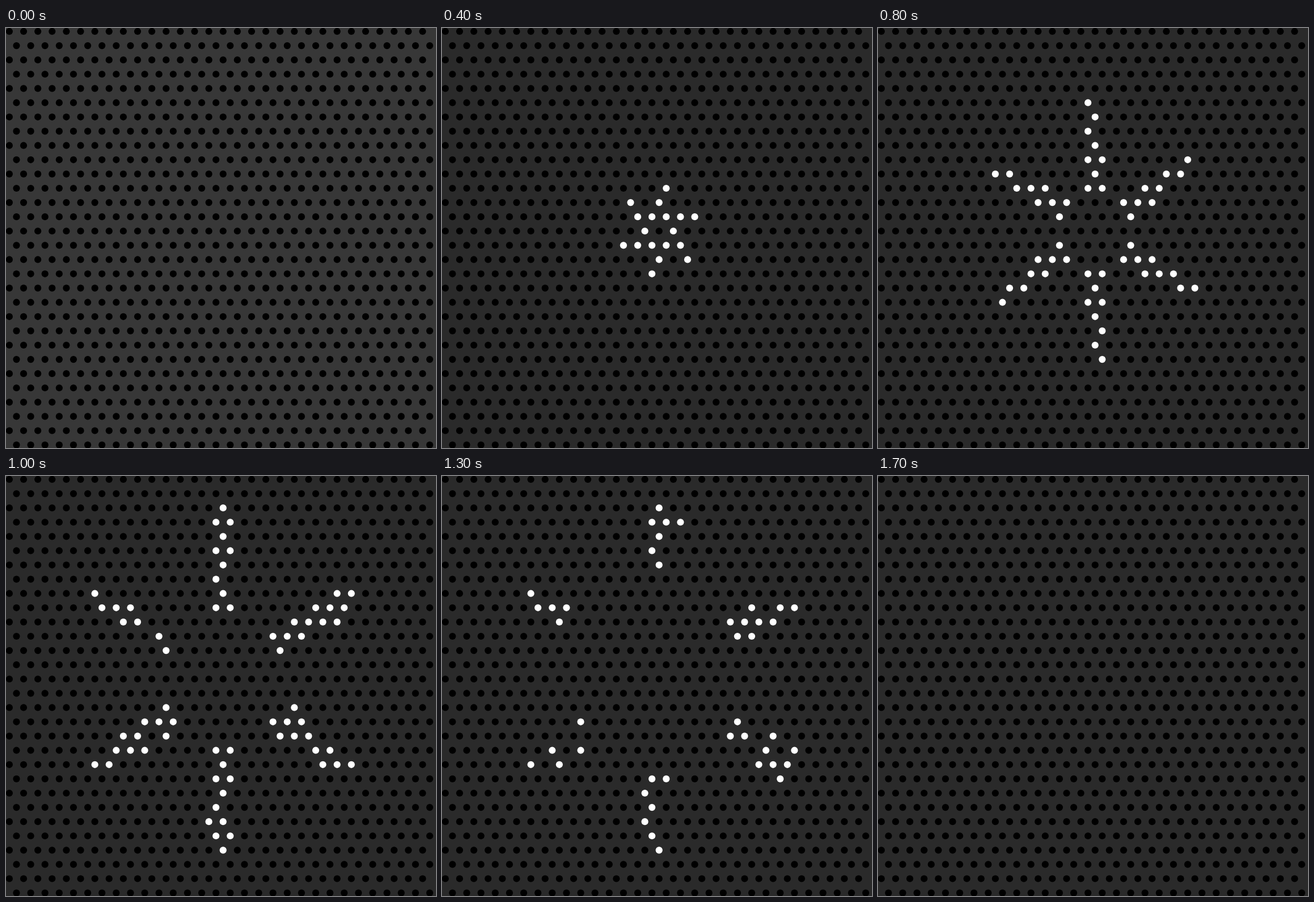
An HTML page with a canvas that plays this animation: 758x739 px, repeating every 1800 ms.

```html
<!DOCTYPE html>
<html lang="en">
<head>
<meta charset="utf-8">
<title>Dot burst</title>
<style>
  html, body { margin: 0; width: 100%; height: 100%; overflow: hidden; background: #2a2a2a; }
  canvas { display: block; }
</style>
</head>
<body>
<canvas id="stage" width="758" height="739"></canvas>
<script>
const ctx = document.getElementById('stage').getContext('2d');
const STEP = 100, STEPS = 18;
const HALF = 12.56, ROW = 25.09, RADIUS = 6.1;
const MID_U = 30, MID_J = 14;

// Fixed random value from 0 to 1 for each cell.
function noise(u, j) {
  const v = Math.sin(u * 12.99 + j * 78.23) * 43758.5;
  return v - Math.floor(v);
}

// The upward arm at step t: its rows, sway, spread and fraying.
function armAt(t) {
  return {
    front: Math.min(1.5 * (t - 2), 11 + .1 * t),
    tail: Math.max(0, .7 * (t - 3.75)),
    lean: .4 * Math.cos((t - 4) * Math.PI / 4),
    width: 1.62 - .23 * Math.max(0, t - 12) ** 2,
    fray: .4 * Math.max(0, t - 8)
  };
}

function inArm(arm, u, row, grain) {
  if (row < arm.tail || row > arm.front) return false;
  const taper = .36 * row / (arm.front || 1);
  return Math.abs(u - arm.lean) < arm.width - taper + arm.fray * (2 * grain - 1);
}

// u counts half columns and j rows from the centre.
// Turning the cell by sixths tests it against all six arms.
function isLit(arm, u, j) {
  const grain = noise(u, j);
  for (let n = 0; n < 6; n++) {
    if (inArm(arm, u, -j, grain)) return true;
    [u, j] = [(u - 3 * j) / 2, (u + j) / 2];
  }
  return false;
}

function draw(step) {
  const arm = armAt(step);
  ctx.fillStyle = step === 0 ? '#373737' : '#2a2a2a';
  ctx.fillRect(0, 0, 758, 739);
  for (let j = 0; j < 30; j++)
    for (let u = j % 2; u < 60; u += 2) {
      ctx.fillStyle = isLit(arm, u - MID_U, j - MID_J) ? '#fff' : '#000';
      ctx.beginPath();
      ctx.arc(5.9 + u * HALF, 6 + j * ROW, RADIUS, 0, 2 * Math.PI);
      ctx.fill();
    }
}

const start = performance.now();
let shown = -1;
function tick() {
  const step = Math.floor((performance.now() - start) / STEP) % STEPS;
  if (step !== shown) draw(shown = step);
  requestAnimationFrame(tick);
}
tick();
</script>
</body>
</html>
```
